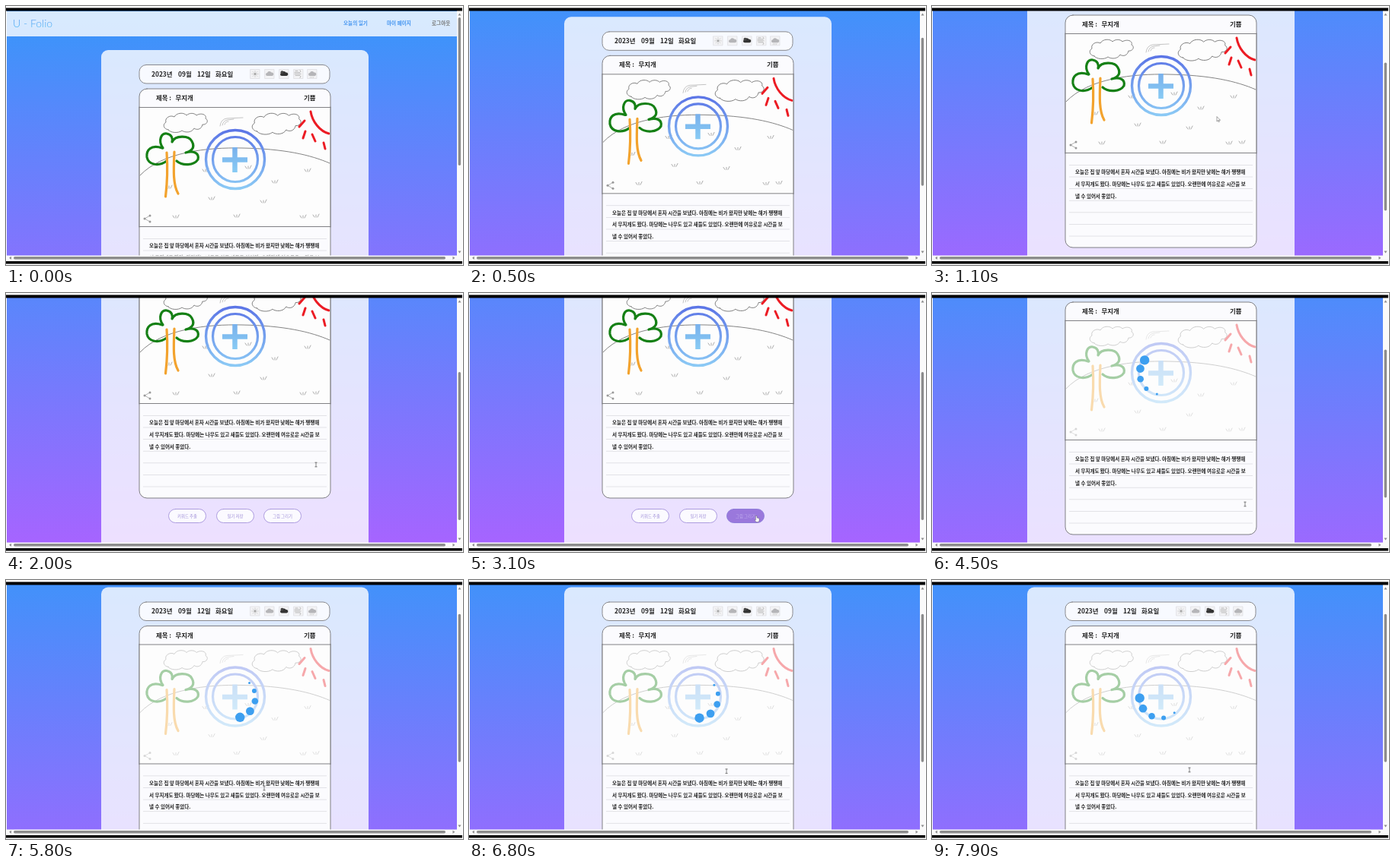
An HTML page with a canvas that plays this animation: 600x341 px, repeating every 8000 ms.

```html
<!DOCTYPE html>
<html lang="ko">
<head>
<meta charset="utf-8">
<style>
html, body { margin: 0; width: 100%; height: 100%; overflow: hidden; background: #fff; }
canvas { display: block; }
</style>
</head>
<body>
<canvas id="stage" width="600" height="341"></canvas>
<script>
const c = document.getElementById('stage').getContext('2d');
const LOOP = 8000;
const KO = '"Noto Sans CJK KR", "Noto Sans CJK", sans-serif';

// Rows are [time, value, ...]
const SCROLL = [[0, 0], [300, 0], [550, 48.5], [700, 48.5], [950, 97], [1450, 97], [1700, 145],
  [3900, 145], [4150, 97], [4900, 97], [5150, 48.5]];
const POINTER = [[600, 372, 140], [1100, 375, 149], [1900, 407, 226], [2400, 407, 226],
  [2900, 378, 297], [3500, 378, 297], [4300, 411, 278], [4700, 411, 278],
  [5600, 339, 274], [6300, 339, 274], [6900, 338, 250]];

function at(rows, t) {
  const i = rows.findIndex(r => r[0] > t);
  if (i === 0) return rows[0].slice(1);
  if (i < 0) return rows[rows.length - 1].slice(1);
  const a = rows[i - 1], b = rows[i];
  const u = (t - a[0]) / (b[0] - a[0]), e = u * u * (3 - 2 * u);
  return a.slice(1).map((v, k) => v + (b[k + 1] - v) * e);
}

function rect(x, y, w, h, fill) {
  c.fillStyle = fill;
  c.fillRect(x, y, w, h);
}

function box(x, y, w, h, r, fill, line, width = 1) {
  c.beginPath();
  c.roundRect(x, y, w, h, r);
  c.fillStyle = fill;
  c.fill();
  if (line) {
    c.strokeStyle = line;
    c.lineWidth = width;
    c.stroke();
  }
}

function stroke(d, color, width) {
  c.strokeStyle = color;
  c.lineWidth = width;
  c.stroke(new Path2D(d));
}

function fill(d, color) {
  c.fillStyle = color;
  c.fill(new Path2D(d));
}

function dot(x, y, r, color) {
  c.beginPath();
  c.arc(x, y, r, 0, 7);
  c.fillStyle = color;
  c.fill();
}

function text(s, x, y, size, color, weight = 'bold', align = 'left', family = KO) {
  c.font = `${weight} ${size}px ${family}`;
  c.textAlign = align;
  c.fillStyle = color;
  c.fillText(s, x, y);
}

function gradient(y0, y1, from, to) {
  const g = c.createLinearGradient(0, y0, 0, y1);
  g.addColorStop(0, from);
  g.addColorStop(1, to);
  return g;
}

function header() {
  rect(1, 7, 591, 33, 'rgba(255,255,255,.8)');
  text('U - Folio', 9, 27.5, 14, gradient(16, 28, '#4f8ff0', '#45b4f4'), 300, 'left', 'Lato, sans-serif');
  text('오늘의 일기', 443, 25, 6.6, '#4595f0');
  text('마이 페이지', 500, 25, 6.6, '#4595f0');
  text('로그아웃', 559, 25, 6.6, '#777');
}

const SMALL_CLOUD = 'M-3 2.5a2 2 0 0 1 0-4a3 3 0 0 1 5.5-.5a2.3 2.3 0 0 1 1 4.5z';

function weather() {
  [327, 346, 365, 384, 402].forEach((x, i) => {
    c.save();
    c.translate(x, 89.5);
    box(-6, -6, 12, 12, 0, '#f3f3f5', '#dcdce0', .7);
    if (i === 0) {
      dot(0, 0, 1.7, '#aaa');
      stroke('M0-4v1.3M0 4v-1.3M-4 0h1.3M4 0h-1.3M-3-3l1 1M3 3l-1-1M-3 3l1-1M3-3l-1 1', '#bbb', .7);
    } else if (i === 3) {
      stroke('M-5-2h7q2-1 0-3M-5 0h8M-4 2h6q2 1 0 3M-4-4h3', '#aaa', .8);
    } else {
      fill(SMALL_CLOUD, i === 2 ? '#333' : '#b5b5b8');
      if (i === 2) dot(-2.5, -2.2, 2, '#444');
      if (i === 4) stroke('M-2 3.5l-.7 1.5M0 3.5l-.7 1.5M2 3.5l-.7 1.5', '#bbb', .6);
    }
    c.restore();
  });
}

const CLOUD = `M213 163C207 162 205 156 210 153C208 147 216 143 221 146C224 140 234 140 237 144
  C241 140 248 141 250 144C256 140 264 143 262 148C267 151 263 157 258 156C257 162 251 164 247 161
  C244 167 235 167 231 164C226 168 216 167 213 163z`;
const TUFTS = [[262, 216], [318, 212], [353, 231], [396, 216], [270, 253], [338, 257],
  [214, 238], [223, 277], [303, 276], [390, 277], [407, 276]];

function drawing() {
  const ink = '#777';
  stroke('M176 223C205 192 265 186 310 187C365 188 400 196 425 207', ink, .9);
  stroke(CLOUD, ink, .9);
  c.save();
  c.translate(323, 141);
  c.scale(1.12, 1.1);
  c.translate(-207, -141);
  stroke(CLOUD, ink, .85);
  c.restore();
  stroke('M281 158Q282 149 290 148L311 147M284 157q1-6 7-7l8-1M287 156q1-4 5-4', '#b5b5b5', .8);
  for (const [x, y] of TUFTS) stroke(`M${x - 4} ${y - 1}l2 3M${x} ${y - 1}l0 3M${x + 4} ${y - 2}l-2 4`, '#888', .7);

  stroke(`M205 187C190 182 184 190 185 199C187 209 200 212 211 204M206 187C199 177 204 167 211 168
    C218 169 219 175 218 179C222 170 240 170 244 178C249 187 243 191 236 193
    C247 190 254 194 252 202C247 210 232 211 224 204`, '#158015', 3.2);
  stroke('M211 193Q213 222 209.500 251M221 192C220 215 219 235 226 247', '#f3a32e', 3.2);
  stroke('M400 139C402 152 412 165 424 168', '#ec1c24', 3);
  stroke('M392 151l-7 8M393 165l-3 9M402 169l4 9M417 180l2 8', '#ec1c24', 3);

  const blue = gradient(162, 242, '#5b74e6', '#8ccbf5');
  c.strokeStyle = blue;
  for (const [r, w] of [[38.5, 3.4], [29.5, 3.2]]) {
    c.beginPath();
    c.arc(301, 202, r, 0, 7);
    c.lineWidth = w;
    c.stroke();
  }
  c.lineCap = 'butt';
  stroke('M284 202.500H317M300.500 186V219', gradient(186, 219, '#78b0ec', '#88cbf4'), 6.5);
  c.lineCap = 'round';

  stroke('M189 276L182 280L189 284', '#aaa', .9);
  for (const [x, y] of [[182, 280], [189, 276], [189, 284]]) dot(x, y, 1.5, '#999');
}

// Five dots chase each other, faster along the bottom of the ring
function spinner(t) {
  const head = 209.5 + (t - 4500) * .7284;
  [6.2, 5.4, 4.3, 3, 1.5].forEach((r, i) => {
    const u = (head - 28 * i) * Math.PI / 180;
    const a = u - .2 * Math.cos(u);
    dot(300 + 27.3 * Math.cos(a), 203 + 27.3 * Math.sin(a), r, '#3d9ff0');
  });
}

function diary(t) {
  box(125, 58, 351, 460, 9, 'rgba(255,255,255,.8)');

  box(175, 77.5, 250, 24.5, 9, 'rgba(255,255,255,.8)', '#8a8a8e');
  [['2023년', 191], ['09월', 226], ['12일', 251], ['화요일', 275]]
    .forEach(([s, x]) => text(s, x, 92.5, 8.4, '#222'));
  weather();

  box(175, 109, 251, 306, 10, '#fbfbfe', '#808084');
  text('제목 :', 197, 124, 8.4, '#222');
  text('무지개', 222.5, 124, 8.4, '#222');
  text('기쁨', 391, 124, 8.4, '#222');

  c.save();
  c.beginPath();
  c.rect(175.5, 133.5, 250, 157);
  c.clip();
  rect(175, 133, 251, 158, '#fdfdfd');
  drawing();
  if (t > 3400) {
    rect(175, 133, 251, 158, 'rgba(253,253,253,.62)');
    spinner(t);
  }
  c.restore();
  stroke('M175 133.500H426M175 290.500H426M175 133V291M426 133V291', '#808084', 1);

  for (let i = 0; i < 7; i++) rect(180, 306 + i * 15.6, 241, .8, '#dcdce2');
  ['오늘은 집 앞 마당에서 혼자 시간을 보냈다. 아침에는 비가 왔지만 낮에는 해가 쨍쨍해',
    '서 무지개도 봤다. 마당에는 나무도 있고 새들도 있었다. 오랜만에 여유로운 시간을 보',
    '낼 수 있어서 좋았다.'].forEach((s, i) => text(s, 188, 318.4 + i * 15.7, 6.5, '#222'));
}

const BUTTONS = [['키워드 추출', 213], ['일기 저장', 276], ['그림 그리기', 338]];
const over = (x, p) => p.x > x && p.x < x + 50 && p.y > 429 && p.y < 448;

function buttons(p) {
  for (const [label, x] of BUTTONS) {
    const hot = over(x, p);
    box(x + .5, 429.5, 49, 18, 9, hot ? '#9a78dc' : '#fbfaff', hot ? '#8a7ad8' : '#a594dc', .9);
    text(label, x + 25, 440.5, 5.4, hot ? '#c3aeee' : '#9d8cd6', 'normal', 'center');
  }
}

function pointer(p) {
  c.save();
  c.translate(p.x, p.y);
  if (BUTTONS.some(b => over(b[1], p))) {
    fill('M-1.500-3.500h1.500v2.500l3 .8v3l-1 1.700h-3l-2-3l1.500 0z', '#fff');
    stroke('M-1.500-3.500h1.500v2.500l3 .8v3l-1 1.700h-3l-2-3l1.500 0z', '#555', .4);
  } else if (p.y > 290 && p.y < 415 && p.x > 175 && p.x < 426) {
    stroke('M-1.200-2.800h2.400M-1.200 2.800h2.400M0-2.800v5.600', '#555', .7);
  } else {
    fill('M-1-3v6l1.500-1.300l1 2l.8-.4l-.9-2h1.800z', '#fff');
    stroke('M-1-3v6l1.500-1.300l1 2l.8-.4l-.9-2h1.800z', '#444', .5);
  }
  c.restore();
}

function frame(scroll) {
  rect(592, 7, 7, 329, '#fafafa');
  rect(1, 328.5, 598, 7.5, '#fafafa');
  box(593.7, 15 + scroll * .614, 3.4, 195, 1.7, '#8c8c8c');
  box(10, 330, 567, 3.4, 1.7, '#8c8c8c');
  fill('M593.500 12.500h4l-2-3zM593.500 322.500h4l-2 3zM7 329.700v4l-3-2zM586.500 329.700v4l3-2z', '#8c8c8c');
  rect(0, 2.5, 599, 4, '#000');
  rect(0, 336, 599, 3.5, '#000');
}

function draw(t) {
  const [scroll] = at(SCROLL, t), [x, y] = at(POINTER, t);
  const p = t < 600 ? { x: -9, y: -9 } : { x, y: y + scroll };
  rect(0, 0, 600, 341, '#fff');
  c.lineCap = c.lineJoin = 'round';
  c.save();
  c.beginPath();
  c.rect(1, 6, 591, 323);
  c.clip();
  c.translate(0, -scroll);
  rect(1, 0, 591, 500, gradient(20, 473, '#3a95fa', '#a664ff'));
  header();
  diary(t);
  buttons(p);
  pointer(p);
  c.restore();
  frame(scroll);
}

function tick() {
  draw(performance.now() % LOOP);
  requestAnimationFrame(tick);
}
tick();
</script>
</body>
</html>
```
